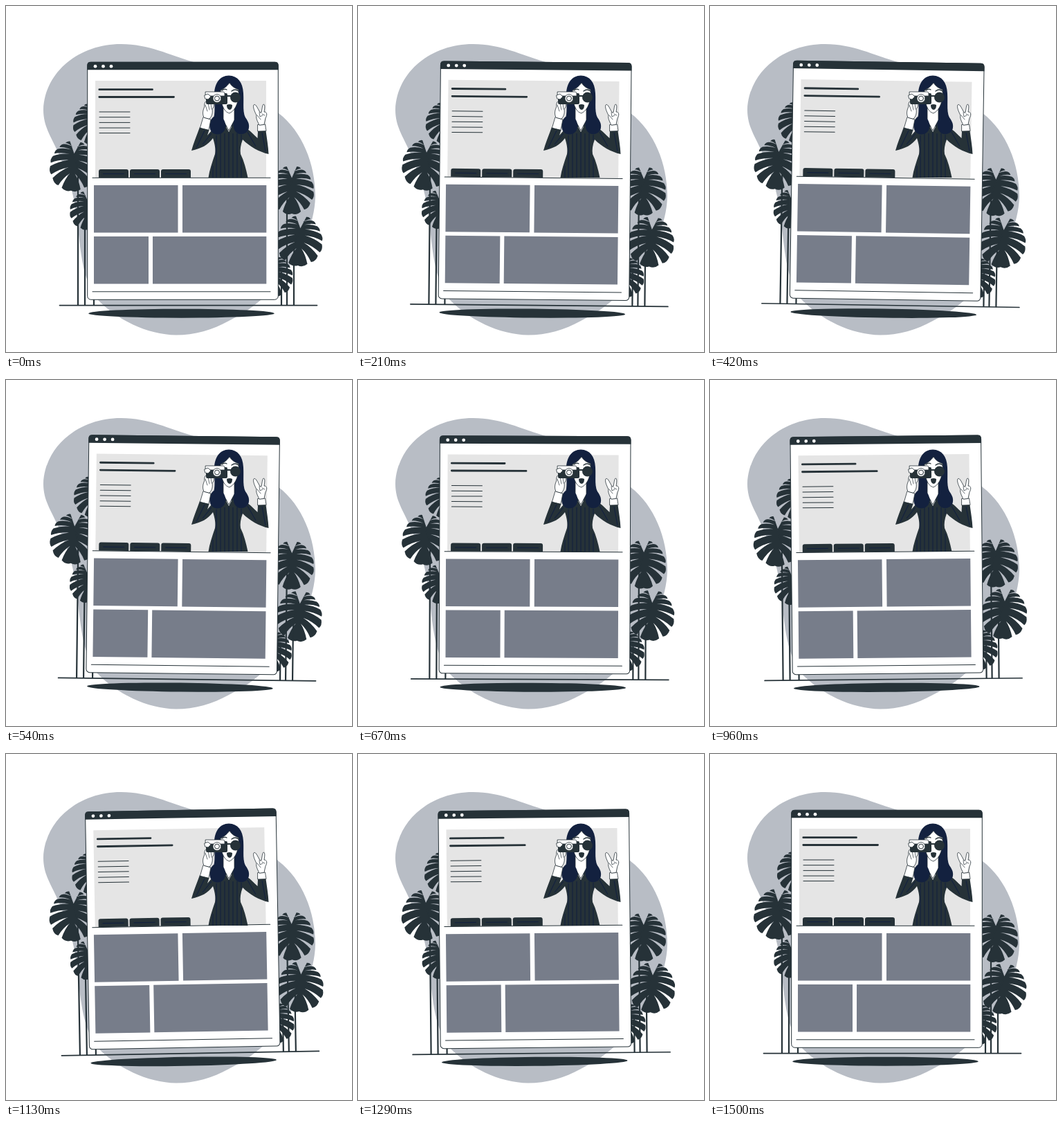
An HTML page for the animation above (1540 ms loop, 500 px wide and 500 px high).

```html
<!DOCTYPE html>
<html lang="en">
<head>
<meta charset="utf-8">
<title>Swaying page</title>
<style>
  html, body { margin: 0; width: 100%; height: 100%; overflow: hidden; background: #fff; }
  svg { display: block; width: 100vw; height: 100vh; }
  .dark { fill: #263238; }
  .navy { fill: #13213f; }
  .line { fill: none; stroke: #263238; stroke-linecap: round; stroke-linejoin: round; }
  .skin { fill: #fff; stroke: #263238; stroke-width: .8; stroke-linejoin: round; stroke-linecap: round; }
  .stripe { fill: none; stroke: #13213f; stroke-width: 1.1; }
</style>
</head>
<body>
<svg viewBox="0 0 500 500">
  <path fill="#b8bdc5" d="M54 150C56 94 107 55 166 55C207 55 236 71 268 80C320 95 364 122 394 155C428 181 447 228 447 275C446 318 426 350 408 378C396 398 386 411 368 425C354 437 340 446 322 455C299 468 272 475.500 246 475.500C204 475 160 453 132 424C108 391 108 348 102 305C98 267 88 241 75 211C65 188 54 174 54 150Z"/>

  <g id="sway">
    <path id="leaves" class="dark"/>
    <path class="line" stroke-width="2.2" d="M98 219Q104 228 104 250V432M114 290V432M127 300V432M398 385V432M413 254Q406 265 406 290V432M424 327Q416 340 416 360V432"/>
    <path class="line" stroke-width="1.7" d="M77.500 432.600H449.500"/>
    <ellipse class="dark" cx="253.500" cy="444.200" rx="134.300" ry="6.500"/>

    <rect x="117.700" y="81.300" width="275.600" height="343" rx="5" fill="#fff" stroke="#263238"/>
    <path class="dark" d="M117.200 92.300V86Q117.200 80.800 122 80.800H389Q393.800 80.800 393.800 86V92.300Z"/>
    <g fill="#fff">
      <circle cx="129" cy="87.200" r="2.400"/><circle cx="140.500" cy="87.200" r="2.400"/><circle cx="152" cy="87.200" r="2.400"/>
    </g>
    <rect x="129" y="108" width="247" height="140" fill="#e5e5e5"/>
    <path class="line" stroke-width="2.800" d="M134.800 120.700H211.500M134.800 131.500H242.500"/>
    <path class="line" stroke-width="1" d="M135 153H179M135 160.700H179M135 168.400H179M135 176.100H179M135 183.600H179"/>
    <path class="dark" d="M134 248V239Q134 236 137 236H174Q177 236 177 239V248ZM179 248V239Q179 236 182 236H219Q222 236 222 239V248ZM224 248V239Q224 236 227 236H264Q267 236 267 239V248Z"/>
    <path class="stripe" d="M140 242.500H171M185 242.500H216M230 242.500H261"/>
    <path class="line" stroke-width="1" d="M125 248.300H382M125 412.800H382"/>
    <path fill="#777d8a" d="M127 259h121.500v68.500h-121.500zM255 259h121.300v68.500h-121.300zM127 333h79v68.500h-79zM212 333h164.300v68.500h-164.300z"/>
  </g>

  <g id="woman">
    <path class="navy" d="M322 100.500C309 101 302 111 301 126C301 143 303 155 299 165L314 178L322 172L332 178L348 165C341 155 344 142 343 126C342 110 335 101 322 100.500Z"/>
    <path class="skin" d="M314 148V165L322 180L330 165V148Z"/>
    <path class="skin" d="M310 122C316 119 320 115 323 111C326 116 331 119 336 121C337 136 333 150 323 155C314 153 310 140 310 122Z"/>
    <path class="line" stroke-width="1.300" d="M326 123Q331 119 336 123M312 122Q316 119 319 121"/>
    <path class="dark" d="M319 143Q323 141 327 143Q327 150 323 150Q319 149 319 143Z"/>

    <path class="dark" d="M297 180L314 167L322 182L330 167L349 178C354 181 359 187 363.500 191L364 181L375.500 180.500C377 192 379 203 379.500 214C366 211 352 203 342 193C339 201 338 208 339 214C344 224 347 236 349.500 248H292.500C294 237 298 226 302 214C303 207 302 200 299 191C292 201 282 206 268 209C271 198 276 186 280 175L293.500 179L291 187Z"/>
    <path class="stripe" d="M299 231V248M304 187V248M310 184V248M316 184V248M322 183V248M328 184V248M334 184V248M340 222V248M340 186V194M287 180L275 205M297 184L284 200M349 182L361 203M370 183L375 210"/>
    <path class="navy" d="M300 160C295 164 293 171 295 178C298 187 309 188 315 181C319 175 317 166 313 162ZM331 162C328 168 327 177 333 183C340 188 350 184 351 176C352 170 349 165 345 160Z"/>

    <g>
      <path class="skin" d="M280.500 176L285 160.500L296 164L293 179Z"/>
      <path class="skin" d="M286 161C283 155 285 150 287 145C286 140 289 136 292 137L299 138C302 142 300 147 298 149C299 156 297 160 294 163Z"/>
      <path class="line" stroke-width=".7" d="M288 143L291 152M292 140L294 150M296 140L297 149"/>
    </g>
    <g>
      <rect class="dark" x="289" y="126" width="31" height="16" rx="2"/>
      <path class="skin" d="M288.500 124H314Q316 124 316 127V130H288.500Z"/>
      <path class="skin" d="M287 129L292 127L296 131L292 135L288 134Z"/>
      <circle class="skin" cx="305" cy="133.500" r="6"/>
      <circle class="line" cx="305" cy="133.500" r="3.500" stroke-width="1"/>
      <path class="line" stroke-width="2" d="M318 130H327"/>
      <circle class="dark" cx="331.500" cy="132" r="7.500"/>
    </g>
    <path class="skin" d="M364 171.500L374.500 171L376 180.500L364 181Z"/>
    <path class="skin" d="M366 172C363 166 361 162 362 158C359 152 356.500 146 358 143C360 141 362 144 367 154L369 154C370 149 370.500 143 372 142C374.500 142 374 147 373 153C377 153 378 157 375 162L373 171Z"/>
    <path class="line" stroke-width=".7" d="M366 154L367 160L371 158M370 156L374 158M363 158L368 164"/>
  </g>
</svg>
<script>
const sway = document.getElementById('sway');
const LOBES = 7, SPAN = 2.95;

// Distance from the stem joint to the leaf edge; angle 0 is the tip, PI the notch.
const edge = a => 0.5 + 0.5 * ((1 + Math.cos(a)) / 2) ** 2;
const rim = (a, grow = 1) => [Math.sin(a) * edge(a) * grow, Math.cos(a) * edge(a) * grow];

// Heart-shaped leaf whose halves are cut by curved slits reaching towards the midrib.
function leaf(x, y, size, tilt) {
  const c = Math.cos(tilt * Math.PI / 180) * size, s = Math.sin(tilt * Math.PI / 180) * size;
  const half = side => {
    const at = ([px, py]) =>
      (x + side * px * c - py * s).toFixed(1) + ' ' + (y + side * px * s + py * c).toFixed(1);
    let d = `M${at([0, 1])}`;
    for (let i = 0; i < LOBES; i++) {
      const [a, b, next] = [i, i + 0.7, i + 1].map(k => k * SPAN / LOBES);
      d += `L${at(rim(a))}Q${at(rim((a + b) / 2, 1.08))} ${at(rim(b))}`;
      if (i === LOBES - 1) break;
      const [cx, cy] = rim((b + next) / 2);
      const inner = [cx * 0.22, cy * 0.62 - 0.08];
      const bend = ([px, py]) => at([(px + inner[0]) / 2 + 0.03, (py + inner[1]) / 2 - 0.05]);
      d += `Q${bend(rim(b))} ${at(inner)}Q${bend(rim(next))} ${at(rim(next))}`;
    }
    return d + `L${at([0, -0.12])}Z`;
  };
  return half(-1) + half(1);
}

document.getElementById('leaves').setAttribute('d', [
  [124, 160, 39, 0], [98, 219, 48, 5], [118, 286, 37, 0],
  [413, 254, 46, 0], [425, 327, 48, 4], [388, 381, 38, 0]
].map(args => leaf(...args)).join(''));

const LOOP = 1540, STEPS = 37;

function draw() {
  const step = Math.floor(performance.now() % LOOP / LOOP * STEPS);
  const p = step / (STEPS - 1);
  const angle = p < 0.25 ? 4 * p : p < 0.75 ? 2 - 4 * p : 4 * p - 4;
  sway.setAttribute('transform', `rotate(${angle} 261.5 265.5)`);
  requestAnimationFrame(draw);
}
draw();
</script>
</body>
</html>
```
